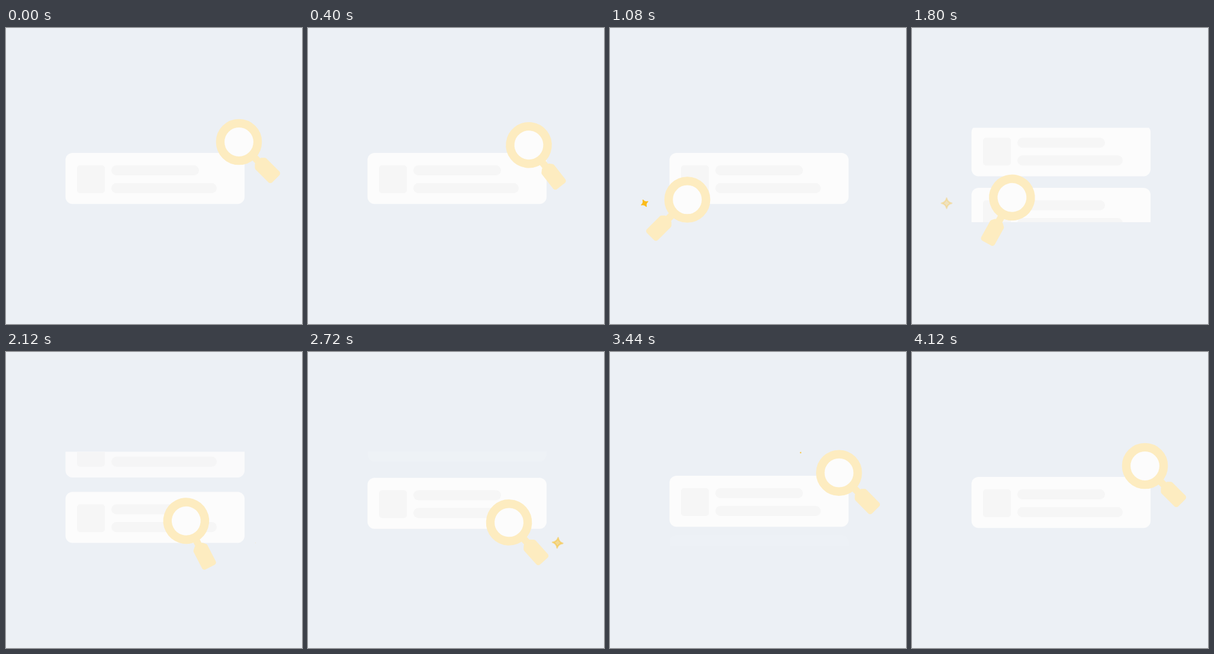
Write an HTML page with a canvas that moves like this. It is 500 px wide and 500 px high and loops after 4.2 s.

```html
<!DOCTYPE html>
<html lang="en">
<head>
<meta charset="utf-8">
<title>Search animation</title>
<style>
  html, body { margin: 0; width: 100%; height: 100%; overflow: hidden; background: #ecf0f5; }
  canvas { display: block; width: 500px; height: 500px; }
</style>
</head>
<body>
<canvas id="stage" width="500" height="500"></canvas>
<script>
const ctx = document.getElementById('stage').getContext('2d');
const LOOP = 4200, STEP = 40;
const CREAM = '#fdecc0', CARD = '#fcfcfc', BAR = '#f6f6f6', GOLD = '#fbbc1c';

const lerp = (a, b, p) => a + (b - a) * p;
const progress = (t, start, end) => Math.min(1, Math.max(0, (t - start) / (end - start)));
const ease = (u, power) => u < .5
  ? (2 * u) ** power / 2
  : 1 - (2 - 2 * u) ** power / 2;

// Magnifier rests: x, y, handle angle in degrees
const rests = [[393.5, 192.5, 45], [130.5, 290, 135], [339.5, 288, 48], [393.5, 192.5, 45]];
// Moves between rests: start, end, ease power, upward bulge
const moves = [[47, 1171, 4, 33], [1258, 2650, 4, 22], [2650, 3800, 3, 0]];
// Card scrolls: start, end, ease power, time warp
const scrolls = [[411, 1111, 3, 1], [1450, 2950, 2, .544], [3309, 4109, 3, 1]];
// Stars: x, y, start, fade start, fade end, final tilt
const stars = [
  [58.5, 296, 908, 1400, 1930, 0],
  [421.7, 322.3, 2060, 2500, 2900, 6],
  [322, 170, 3340, 3750, 4115, 0]
];

function box(x, y, w, h, r, color) {
  ctx.fillStyle = color;
  ctx.beginPath();
  ctx.roundRect(x, y, w, h, r);
  ctx.fill();
}

function drawCard(y, alpha) {
  ctx.globalAlpha = alpha;
  box(100.5, y, 302.5, 86.3, 12, CARD);
  box(120, y + 21, 47, 47, 5, BAR);
  box(178, y + 21, 148, 17, 8.5, BAR);
  box(178, y + 51, 178, 17, 8.5, BAR);
  ctx.globalAlpha = 1;
}

function drawCards(t) {
  ctx.save();
  ctx.beginPath();
  ctx.rect(90, 168.5, 320, 159.5);
  ctx.clip();
  const active = scrolls.find(([start, end]) => t > start && t < end);
  if (active) {
    const [start, end, power, warp] = active;
    const q = ease(progress(t, start, end) ** warp, power);
    drawCard(211 - 114 * q, 1 - q ** 8);
    drawCard(311 - 100 * q, Math.min(1, q * 4.3));
  } else {
    drawCard(211, 1);
  }
  ctx.restore();
}

function drawMagnifier(t) {
  const i = Math.max(0, moves.findLastIndex(m => t >= m[0]));
  const [start, end, power, bulge] = moves[i];
  const p = ease(progress(t, start, end), power);
  const [x, y, angle] = rests[i].map((v, k) => lerp(v, rests[i + 1][k], p));
  ctx.save();
  ctx.translate(x, y - bulge * p * (1 - p));
  ctx.rotate(angle * Math.PI / 180);
  box(34, -6, 14, 12, 0, CREAM);
  ctx.beginPath();
  ctx.moveTo(45, 0);
  ctx.arcTo(45, -7, 51, -13, 2);
  ctx.arcTo(51, -13, 88, -13, 4);
  ctx.arcTo(88, -13, 88, 13, 4.5);
  ctx.arcTo(88, 13, 51, 13, 4.5);
  ctx.arcTo(51, 13, 45, 7, 4);
  ctx.arcTo(45, 7, 45, 0, 2);
  ctx.fill();
  ctx.beginPath();
  ctx.arc(0, 0, 31.6, 0, 2 * Math.PI);
  ctx.fillStyle = CARD;
  ctx.fill();
  ctx.strokeStyle = CREAM;
  ctx.lineWidth = 14.4;
  ctx.stroke();
  ctx.restore();
}

function drawStar(t, [x, y, start, fade, end, tilt]) {
  if (t <= start || t >= end) return;
  const grow = ease(progress(t, start, start + 300), 3);
  ctx.save();
  ctx.globalAlpha = 1 - progress(t, fade, end);
  ctx.translate(x, y);
  ctx.rotate((tilt - 90 * (1 - grow)) * Math.PI / 180);
  ctx.scale(grow, grow);
  ctx.beginPath();
  ctx.moveTo(8.7, 0);
  ctx.quadraticCurveTo(1.5, 1.5, 0, 8.7);
  ctx.quadraticCurveTo(-1.5, 1.5, -8.7, 0);
  ctx.quadraticCurveTo(-1.5, -1.5, 0, -8.7);
  ctx.quadraticCurveTo(1.5, -1.5, 8.7, 0);
  ctx.closePath();
  ctx.fillStyle = ctx.strokeStyle = GOLD;
  ctx.lineWidth = 2.4;
  ctx.lineJoin = 'round';
  ctx.fill();
  ctx.stroke();
  ctx.restore();
}

const origin = performance.now();

function draw() {
  const elapsed = Math.max(0, performance.now() - origin) % LOOP;
  const t = Math.floor(elapsed / STEP) * STEP;
  ctx.fillStyle = '#ecf0f5';
  ctx.fillRect(0, 0, 500, 500);
  drawCards(t);
  drawMagnifier(t);
  stars.forEach(star => drawStar(t, star));
  requestAnimationFrame(draw);
}
draw();
</script>
</body>
</html>
```
